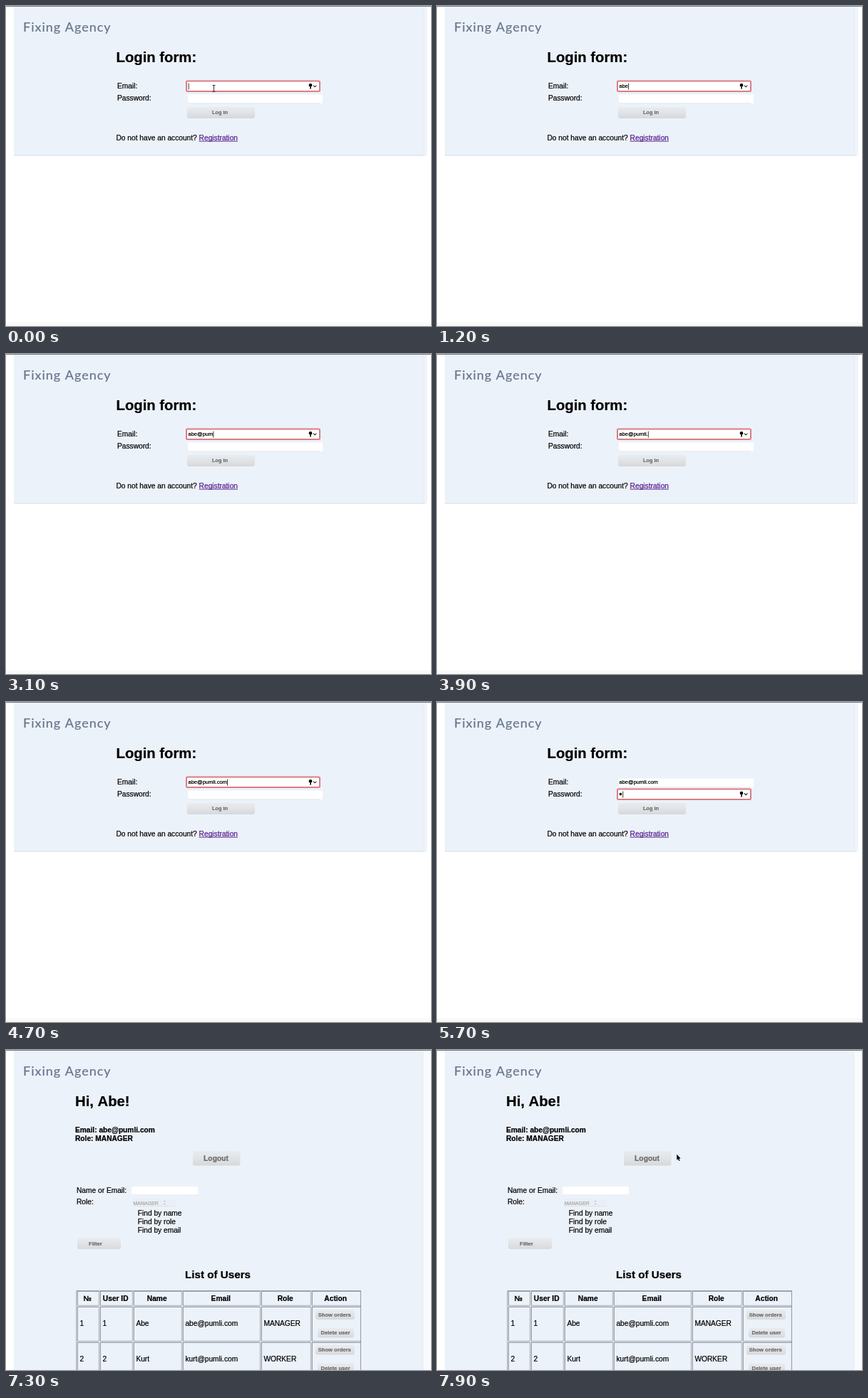
Recreate the animation shown at these times as an HTML page with a canvas. Size 596 by 450 pixels, loop 8000 ms.

```html
<!DOCTYPE html>
<html lang="en">
<head>
<meta charset="utf-8">
<title>Login form</title>
<style>
  html, body { margin: 0; width: 100%; height: 100%; overflow: hidden; background: #fff; }
  canvas { display: block; width: 596px; height: 450px; }
</style>
</head>
<body>
<canvas id="stage" width="596" height="450"></canvas>
<script>
const ctx = document.getElementById('stage').getContext('2d');
const LOOP = 8000;
const W = 596, H = 450;
const PANEL = '#ecf2f9';
const ARIAL = '"Liberation Sans", Arial, sans-serif';
const BASE = 10.2, SMALL = 7.5;

const EMAIL = 'abe@pumli.com';
const EMAIL_KEYS = [1000, 1100, 1200, 2100, 2700, 2900, 3100, 3300, 3500, 3800, 4000, 4200, 4300];
const PASS_KEYS = [5700, 5900, 6100, 6300];
const FOCUS_PASS = 5200, CARET_OFF = 6600, LOGGED_IN = 7300, POINTER_ON = 7800;

const typed = (keys, t) => keys.filter(k => k <= t).length;

function rect(x, y, w, h, color) {
  ctx.fillStyle = color;
  ctx.fillRect(x, y, w, h);
}

// A hairline outline gives the glyphs a slightly heavier smoothing.
function glyphs(str, x, y, color) {
  ctx.fillStyle = ctx.strokeStyle = color;
  ctx.lineWidth = 0.22;
  ctx.fillText(str, x, y);
  ctx.strokeText(str, x, y);
}

function text(str, x, y, { size = BASE, bold = false, color = '#000', align = 'left' } = {}) {
  ctx.font = `${bold ? 'bold ' : ''}${size}px ${ARIAL}`;
  ctx.textAlign = align;
  glyphs(str, x, y, color);
  return ctx.measureText(str).width;
}

function stroke(points, color, width) {
  ctx.beginPath();
  points.forEach(([x, y]) => ctx.lineTo(x, y));
  ctx.strokeStyle = color;
  ctx.lineWidth = width;
  ctx.stroke();
}

function button(label, x, y, w, h, cx, base, size = 7.6) {
  const fill = ctx.createLinearGradient(0, y, 0, y + h);
  fill.addColorStop(0, '#e9ecef');
  fill.addColorStop(0.5, '#e1e3e6');
  fill.addColorStop(1, '#d6d8da');
  ctx.fillStyle = fill;
  ctx.beginPath();
  ctx.roundRect(x, y, w, h, 3);
  ctx.fill();
  text(label, cx, base, { size, bold: true, color: '#6c6c6c', align: 'center' });
}

function keyIcon(y) {
  ctx.fillStyle = '#000';
  ctx.beginPath();
  ctx.arc(427, y - 1.4, 2.3, 0, Math.PI * 2);
  ctx.fill();
  rect(426.3, y, 1.5, 4, '#000');
  stroke([[431, y - 1], [433.2, y + 1.2], [435.4, y - 1]], '#222', 1.1);
}

function field(y, focused) {
  if (!focused) {
    rect(255, y + 3, 189, 12.5, '#fff');
    rect(255, y + 15, 185, 0.7, '#dcdfe4');
    return;
  }
  ctx.fillStyle = '#fff';
  ctx.strokeStyle = '#de7c83';
  ctx.lineWidth = 2;
  ctx.beginPath();
  ctx.roundRect(253, y + 1, 187, 14.4, 1.5);
  ctx.fill();
  ctx.stroke();
  keyIcon(y + 8);
}

function caret(x, y) {
  rect(x, y + 4, 0.9, 9, '#222');
}

function frame(panelHeight) {
  rect(0, 0, W, H, '#fff');
  rect(11, 0, 574, panelHeight, PANEL);
  rect(0, 0, W, 1, '#757b86');
  ctx.font = '18px Lato, "Open Sans", sans-serif';
  ctx.letterSpacing = '1px';
  ctx.textAlign = 'left';
  glyphs('Fixing Agency', 24, 36, '#68758d');
  ctx.letterSpacing = '0px';
}

function loginPage(t) {
  frame(210);
  rect(585, 1, 5.5, 209, '#eff3fa');
  rect(584.6, 1, 0.6, 209, '#dfe5ee');
  rect(11, 209.6, 577, 1, '#d6dde8');
  rect(0, 444.5, W, 5.5, '#f9f9f8');

  text('Login form:', 154.5, 79, { size: 20.3, bold: true });
  text('Email:', 156, 116);
  text('Password:', 156, 133);

  const onPass = t >= FOCUS_PASS;
  field(104.6, !onPass);
  field(121.5, onPass);

  const width = text(EMAIL.slice(0, typed(EMAIL_KEYS, t)), 255.5, 115.2, { size: SMALL });
  const dots = typed(PASS_KEYS, t);
  ctx.fillStyle = '#000';
  for (let i = 0; i < dots; i++) {
    ctx.beginPath();
    ctx.arc(257.4 + i * 4.6, 129.6, 1.8, 0, Math.PI * 2);
    ctx.fill();
  }
  if (!onPass) caret(255.7 + width, 104.6);
  else if (t < CARET_OFF) caret(255.7 + dots * 4.6, 121.5);

  if (t < EMAIL_KEYS[0]) {
    stroke([[291.5, 111.5], [291.5, 120.5]], '#333', 1);
    stroke([[289.5, 111.5], [293.5, 111.5]], '#333', 1);
    stroke([[289.5, 120.5], [293.5, 120.5]], '#333', 1);
  }

  button('Log in', 254, 142, 95, 16, 300, 152, 7.3);

  const x = 154.5 + text('Do not have an account? ', 154.5, 188.6);
  const link = text('Registration', x, 188.6, { color: '#551a8b' });
  rect(x, 189.7, link, 0.9, '#551a8b');
}

function bevel(x, y, w, h, topLeft, bottomRight) {
  stroke([[x, y + h], [x, y], [x + w, y]], topLeft, 0.9);
  stroke([[x + w, y], [x + w, y + h], [x, y + h]], bottomRight, 0.9);
}

function usersTable() {
  const cols = [99, 131, 178, 247, 357, 428, 498];
  const rows = [338, 360, 410, 459];
  const heads = ['№', 'User ID', 'Name', 'Email', 'Role', 'Action'];
  const users = [
    ['1', '1', 'Abe', EMAIL, 'MANAGER'],
    ['2', '2', 'Kurt', 'kurt@pumli.com', 'WORKER'],
  ];
  const dark = '#70757d', light = '#a9aeb6';

  bevel(98.5, 338.5, 399, 130, light, dark);
  for (let r = 0; r < 3; r++) {
    for (let c = 0; c < 6; c++) {
      bevel(cols[c] + 1.2, rows[r] + 1.2, cols[c + 1] - cols[c] - 1.9, rows[r + 1] - rows[r] - 1.9, dark, light);
    }
  }

  heads.forEach((h, c) =>
    text(h, (cols[c] + cols[c + 1]) / 2 - 0.8, 353, { bold: true, align: 'center' }));
  users.forEach((user, r) => {
    const dy = r * 49.5;
    user.forEach((s, c) => text(s, cols[c] + 4.4, 388 + dy));
    button('Show orders', 434, 365.5 + dy, 55, 13.5, 460.7, 374.6 + dy);
    button('Delete user', 437, 391 + dy, 51, 13.5, 462, 400 + dy);
  });
}

function pointer(x, y) {
  const shape = [[0, 0], [0, 8], [1.8, 6.5], [3, 9.3], [4.3, 8.7], [3.1, 6], [5.3, 5.8]];
  ctx.beginPath();
  shape.forEach(([dx, dy]) => ctx.lineTo(x + dx, y + dy));
  ctx.closePath();
  ctx.fillStyle = '#000';
  ctx.fill();
}

function managerPage(t) {
  frame(H);
  rect(585, 1, 11, H, '#f8fafd');
  rect(584.6, 1, 0.6, H, '#e3e8f0');

  text('Hi, Abe!', 97, 79, { size: 20.3, bold: true });
  text('Email: ' + EMAIL, 97, 116, { bold: true });
  text('Role: MANAGER', 97, 128, { bold: true });
  button('Logout', 262, 142, 66.5, 20.5, 294.5, 156.2, 10.3);

  text('Name or Email:', 99, 201);
  rect(176, 192, 93, 11, '#fff');
  text('Role:', 99, 217.3);
  rect(178, 209, 61, 11, '#eaeff5');
  rect(178, 219.4, 61, 0.8, '#dbdfe6');
  text('MANAGER', 178.5, 217.6, { size: 7, color: '#a6a8ac' });
  rect(221.5, 212, 1.6, 1.2, '#a5a7ab');
  rect(221.5, 216, 1.6, 1.2, '#a5a7ab');
  ['name', 'role', 'email'].forEach((s, i) => text('Find by ' + s, 184.8, 233 + i * 12));
  button('Filter', 100, 264.5, 61, 15.5, 125.3, 275.2);

  text('List of Users', 297, 320.8, { size: 15.2, bold: true, align: 'center' });
  usersTable();
  if (t >= POINTER_ON) pointer(336.3, 146.8);
}

function tick() {
  const t = performance.now() % LOOP;
  (t < LOGGED_IN ? loginPage : managerPage)(t);
  requestAnimationFrame(tick);
}
tick();
</script>
</body>
</html>
```
